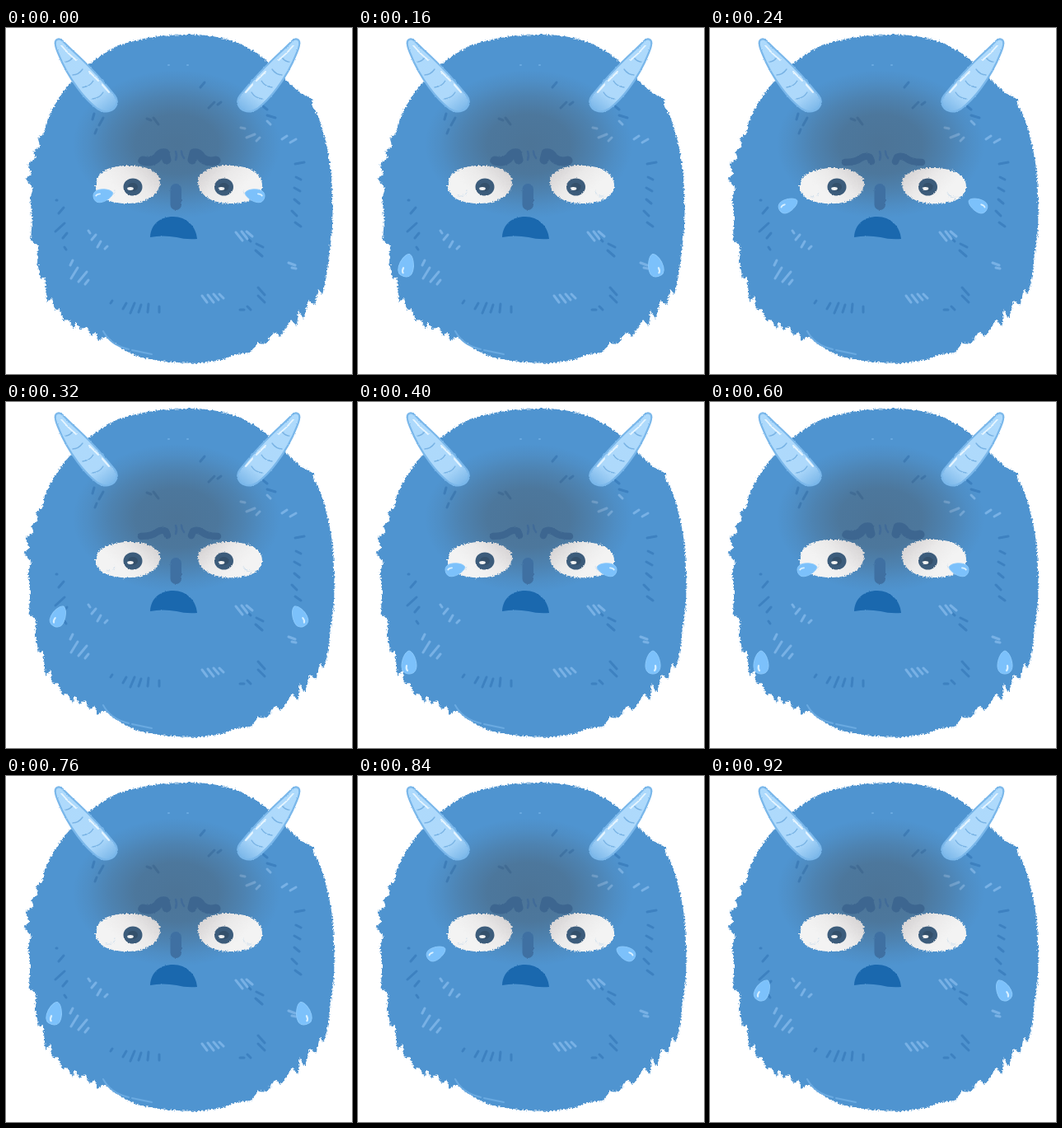
Animation of 420 by 420 pixels, one loop 0.96 s. Source, as an HTML page:

```html
<!DOCTYPE html>
<html lang="en">
<head>
<meta charset="utf-8">
<title>Crying monster</title>
<style>
  html, body { margin: 0; width: 100%; height: 100%; overflow: hidden; background: #fff; }
  svg { display: block; width: 100vw; height: 100vh; }
  .line { fill: none; stroke-linecap: round; stroke-linejoin: round; }
</style>
</head>
<body>
<svg viewBox="0 0 420 420">
  <defs>
    <filter id="rough" x="0" y="0" width="420" height="420" filterUnits="userSpaceOnUse" color-interpolation-filters="sRGB">
      <feTurbulence type="fractalNoise" baseFrequency=".45" numOctaves="2" seed="4"/>
      <feDisplacementMap in="SourceGraphic" scale="5" xChannelSelector="R" yChannelSelector="G"/>
    </filter>
    <filter id="chalk" x="0" y="0" width="420" height="420" filterUnits="userSpaceOnUse" color-interpolation-filters="sRGB">
      <feTurbulence type="fractalNoise" baseFrequency=".4" numOctaves="2" seed="9"/>
      <feDisplacementMap in="SourceGraphic" scale="2" xChannelSelector="R" yChannelSelector="G"/>
    </filter>
    <radialGradient id="gloom" gradientUnits="userSpaceOnUse" r="1" cx="0" cy="0" gradientTransform="translate(207 141) scale(126 90)">
      <stop offset="0" stop-color="#484848" stop-opacity=".42"/>
      <stop offset=".4" stop-color="#484848" stop-opacity=".38"/>
      <stop offset=".65" stop-color="#484848" stop-opacity=".23"/>
      <stop offset=".85" stop-color="#484848" stop-opacity=".08"/>
      <stop offset="1" stop-color="#484848" stop-opacity="0"/>
    </radialGradient>
    <linearGradient id="eyeFill" gradientUnits="userSpaceOnUse" x1="179" y1="166" x2="142" y2="204">
      <stop offset="0" stop-color="#d3d0d1"/>
      <stop offset=".55" stop-color="#ebeaea"/>
      <stop offset="1" stop-color="#f3f3f3"/>
    </linearGradient>
    <linearGradient id="hornFill" gradientUnits="userSpaceOnUse" x1="62" y1="15" x2="128" y2="102">
      <stop offset="0" stop-color="#aedafc"/>
      <stop offset=".75" stop-color="#aed9fb"/>
      <stop offset="1" stop-color="#78b5e8"/>
    </linearGradient>

    <g id="horn" filter="url(#chalk)">
      <path d="M62 14Q57 16 63 30Q72 53 87 73Q98 88 111 98Q122 105 131 98Q138 90 132 82Q112 57 91 37Q79 26 69 16Q65 12 62 14Z" fill="url(#hornFill)" stroke="#7ab7ea" stroke-width="2.2"/>
      <path class="line" stroke="#79b3e4" stroke-width="1.4" d="M72 41Q77 41 81 36M81 57Q88 57 93 50M93 72Q102 71 106 64M105 86Q114 85 118 78"/>
      <path class="line" stroke="#e6f5ff" stroke-width="2" d="M67 21Q75 31 85 39M101 53L112 64M117 69L125 78"/>
    </g>

    <g id="eye">
      <path d="M109 192C108 176 125 167 148 167C170 166 187 175 187 186C187 202 171 213 148 213C125 213 110 206 109 192Z" fill="url(#eyeFill)"/>
      <path class="line" d="M122 204Q131 205 132 198" stroke="#d3e1ed" stroke-width="1.3"/>
    </g>

    <g id="pupil">
      <ellipse rx="11.5" ry="10.5" fill="#3c5c7b"/>
      <ellipse rx="6" ry="5" fill="#34506b"/>
      <ellipse cx="-3" cy="2" rx="3.8" ry="1.9" fill="#f4f4f4"/>
    </g>

    <path id="browSad" class="line" d="M166 161Q176 164 183 158Q187 151 193 152L195 160" stroke="#3d6690" stroke-width="11"/>
    <path id="browFlat" class="line" d="M164 163Q177 163 183 158Q189 154 194 157L196 162" stroke="#3d6690" stroke-width="8.5"/>

    <g id="drop">
      <path d="M0-14C5-13 9-3 9 4C9 11 5 14 0 14C-5 14-9 11-9 4C-9-3-5-13 0-14Z" fill="#7cc1fb" stroke="#8ccafc" stroke-width="1"/>
      <path class="line" d="M-3 4Q-4 8-2 10" stroke="#d9f0ff" stroke-width="2.2"/>
    </g>
  </defs>

  <g filter="url(#rough)">
    <path id="fur" fill="#4f94d0" d="M222 8Q260 8 288 21Q314 34 332 56L357 79L372 86L371 93Q381 108 386 130Q396 166 396 205Q398 245 392 274Q390 303 384 323L379 317L375 336L367 331L361 353L355 342L353 362L346 354L333 374L325 369L316 383L306 382L296 394L280 396L262 403L235 407Q195 407 164 400Q140 392 121 374L112 380L109 369L103 374L98 362L91 366L84 356L83 366L76 354L70 355L65 341L59 343L56 326L50 332L47 302L42 304L38 285L39 264L30 258L32 230L29 207L33 195L24 183L31 177L26 165L36 158L33 150L41 144L39 134L47 126L49 114Q60 88 77 68Q104 37 137 21Q175 8 222 8Z"/>
  </g>

  <g class="line" stroke-width="3">
    <path stroke="#3d81c0" d="M61 209l1 0M64 225l6-7M60 247l11-10M69 255l5-6M73 269l-2-3M107 104l-2 7M118 109l-5 9M110 123l-2 5M171 110l5 2M179 109l6 8M236 72l5-6M246 97l7-7M257 93l4-3"/>
    <path stroke="#3d81c0" d="M312 95l5 4M317 106l10 3M351 165l11-2M352 181l6 3M350 194l7 4M350 208l6 5M347 222l6 6M351 236l7 5M293 255l4 4M304 262l8 4M303 270l8 7M306 315l8 9M306 325l8 8M293 338l4 4M284 342l5 0"/>
    <path stroke="#3d81c0" d="M127 334l2-3M142 341l4-7M151 346l5-12M161 345l3-9M172 345l1-10M186 345l0-7"/>
    <path stroke="#78b1e5" d="M285 121l5 1M292 133l10-4M304 137l4-4M317 113l4 4M335 135l6-4M345 139l7-4M279 248l8 10M286 247l7 9M292 247l7 6M100 246l2 3M104 257l5-6M111 266l4-7M120 268l3-3"/>
    <path stroke="#78b1e5" d="M78 288l3-6M79 304l8-13M88 308l10-12M96 311l4-5M238 325l6 8M245 324l7 9M252 323l6 7M259 323l5 5M343 285l8 3M347 291l5 1"/>
    <path stroke="#6aaae1" stroke-width="2" d="M118 368Q127 385 149 390M153 391L177 396M197 45h1M220 45h1"/>
  </g>

  <rect x="75" y="45" width="265" height="192" fill="url(#gloom)"/>
  <g filter="url(#rough)">
    <g id="eyes">
      <use href="#eye"/>
      <use href="#eye" transform="translate(420) scale(-1 1)"/>
    </g>
  </g>

  <g filter="url(#chalk)">
    <use href="#pupil" x="154" y="193"/>
    <use href="#pupil" x="264.500" y="193"/>
    <g id="sad">
      <use href="#browSad"/>
      <use href="#browSad" transform="translate(421) scale(-1 1)"/>
    </g>
    <g id="flat">
      <use href="#browFlat"/>
      <use href="#browFlat" transform="translate(421) scale(-1 1)"/>
    </g>
    <path class="line" stroke="#416b98" stroke-width="2.5" d="M206 150Q208 155 206 160M213 150Q213 154 216 158"/>
    <rect x="199.500" y="189" width="13.500" height="32" rx="6.500" fill="#3f70a2"/>
  </g>
  <path d="M175 254C176 238 187 229 203 229C219 229 231 241 232 256Q218 257 207 254Q190 251 175 254Z" fill="#1a68ae" filter="url(#chalk)"/>

  <use href="#horn"/>
  <use href="#horn" transform="translate(416) scale(-1 1)"/>

  <g class="tears"></g>
  <g class="tears" transform="translate(420) scale(-1 1)"></g>
</svg>

<script>
  const STEP = 40, STEPS = 24, CYCLE = 5;
  // x, y, tilt and scale of a falling tear
  const fall = [
    [118, 203, 76, .86], [95, 215, 62, .87], [77, 235, 44, .92],
    [64, 260, 26, .95], [59, 288, 14, 1], [62, 316, 0, 1]
  ];
  const byId = id => document.getElementById(id);
  const show = (el, on) => el.setAttribute('visibility', on ? 'visible' : 'hidden');
  const sides = [...document.querySelectorAll('.tears')].map(g => [0, 1].map(() => {
    const drop = document.createElementNS('http://www.w3.org/2000/svg', 'use');
    drop.setAttribute('href', '#drop');
    return g.appendChild(drop);
  }));

  function place(drop, [x, y, tilt, size]) {
    drop.setAttribute('transform', `translate(${x} ${y}) rotate(${tilt}) scale(${size})`);
  }

  function draw(step) {
    const phase = step % CYCLE;
    const frown = step >= 5 && step < 15;
    show(byId('sad'), !frown);
    show(byId('flat'), frown);
    byId('eyes').setAttribute('transform', frown ? 'translate(0 13) scale(1 .94)' : '');
    byId('fur').setAttribute('transform', step < 5 ? '' : 'translate(-2.7) scale(1.012 1)');
    for (const [fresh, last] of sides) {
      place(fresh, fall[phase]);
      place(last, fall[CYCLE]);
      show(last, phase === 0 && step > 0);
    }
  }

  let shown = -1;
  function tick() {
    const step = Math.floor(performance.now() / STEP) % STEPS;
    if (step !== shown) draw(shown = step);
    requestAnimationFrame(tick);
  }
  tick();
</script>
</body>
</html>
```
